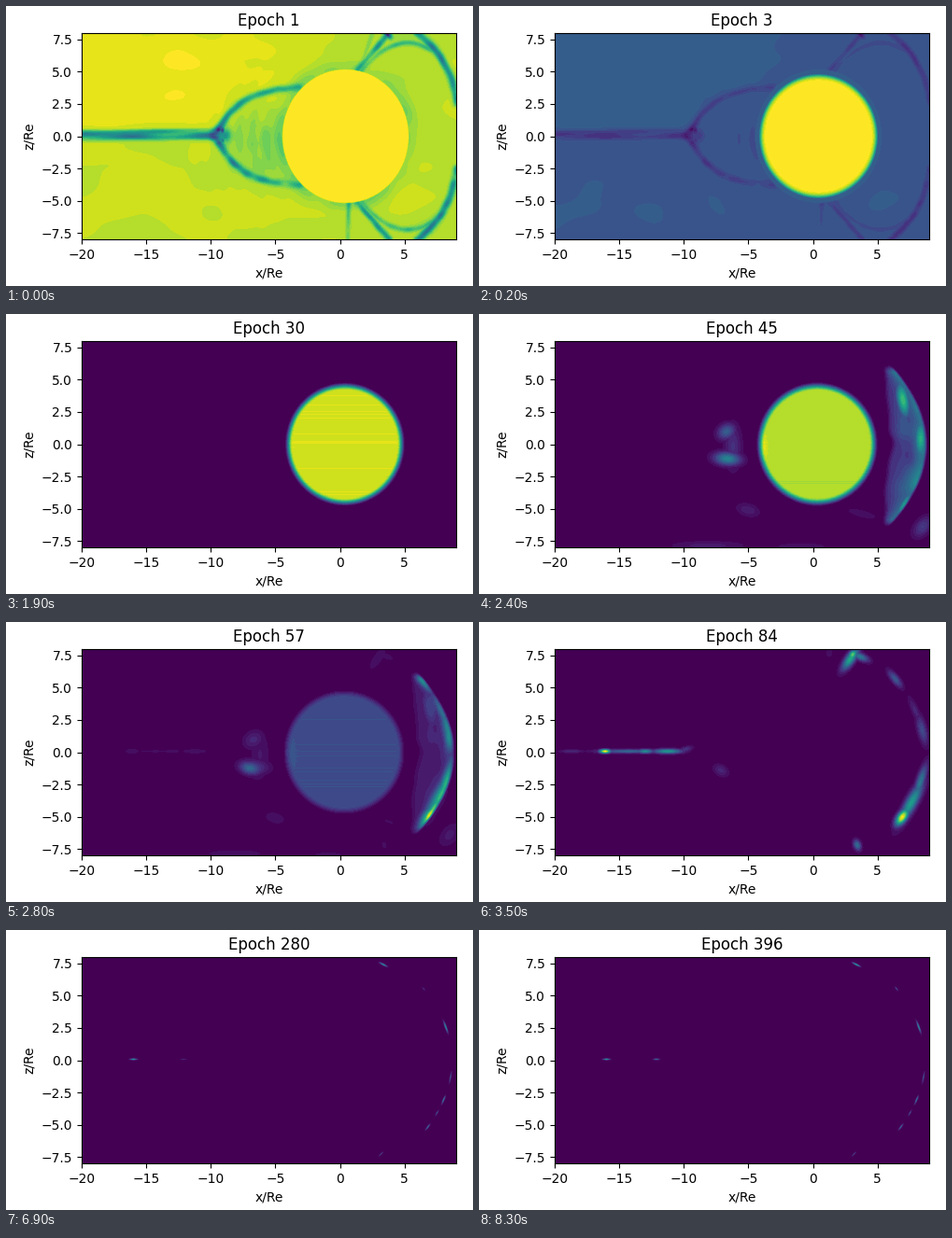
These frames come from a looping animation (500 px wide and 300 px high, 8400 ms). A matplotlib script:

```python
import numpy as np
import matplotlib.pyplot as plt
from matplotlib.animation import FuncAnimation

# Plot area in stage pixels (y runs downwards)
LEFT, TOP, W, H = 81, 29, 401, 221
MID = 139.5
FRAMES, STEP = 84, 100
LEVELS = 28
EPS = 0.01

X, Y = np.meshgrid(LEFT + 0.5 + np.arange(W), TOP + 0.5 + np.arange(H))
rng = np.random.default_rng(7)


def noise(sx, sy):
    """Smooth random field with feature sizes sx, sy in pixels."""
    def weights(n, s):
        knots = np.arange(-s, n + 2 * s, s)
        m = np.exp(-((np.arange(n)[:, None] - knots) / (0.75 * s)) ** 2)
        return m / m.sum(1, keepdims=True)
    wx, wy = weights(W, sx), weights(H, sy)
    return 1.6 * wy @ rng.normal(size=(wy.shape[1], wx.shape[1])) @ wx.T


def sigmoid(v):
    return 1 / (1 + np.exp(-v))


def smooth(v):
    v = np.clip(v, 0, 1)
    return v * v * (3 - 2 * v)


def top(*fields):
    return np.max(fields, axis=0)


def spot(x, y, deg, a, b, amp):
    c, s = np.cos(np.radians(deg)), np.sin(np.radians(deg))
    u = (X - x) * c + (Y - y) * s
    v = (Y - y) * c - (X - x) * s
    return amp * np.exp(-(u / a) ** 2 - (v / b) ** 2)


def arc_spot(y, a, b, amp):
    """Spot lying along the dayside arc."""
    d = (y - 140) / 85
    slope = np.degrees(np.arctan2(85, -74 * d))
    return spot(477.5 - 37 * d * d, y, slope, a, b, amp)


def tail_spot(x, a, b, amp):
    return spot(x, 138.5, 0, a, b, amp)


def stroke(xs, ys, width, amp):
    out = np.zeros_like(X)
    for x, y, a in zip(xs, ys, np.broadcast_to(amp, len(xs))):
        np.maximum(out, a * np.exp(-((X - x) ** 2 + (Y - y) ** 2) / width ** 2), out)
    return out


def mirrored(xs, rise, width, amp):
    """The same line above and below the midplane."""
    return np.maximum(stroke(xs, MID - rise, width, amp),
                      stroke(xs, MID + rise, width, amp))


def radius(cx, rx, ry):
    return np.hypot((X - cx) / rx, (Y - MID) / ry)


def disk(cx, rx, ry, soft):
    return smooth((1 - radius(cx, rx, ry)) * rx / soft)


def field_lines():
    t = np.linspace(0, 1, 60)
    x = 228 + 86 * t
    lobe = mirrored(x, 8 + 46 * (1 - np.exp(-(x - 228) / 26)), 3.6, 0.4 - 0.2 * t)
    cusp = mirrored(376 + 34 * t, 71 + 39 * t, 3, 0.22 + 0.2 * t)
    x = 379 + 78 * t
    loop = mirrored(x, 100 - 30 * ((x - 430) / 50) ** 2, 2.8, 0.13 + 0.08 * t)
    rise = 35 + 76 * t
    bow = mirrored(484 - 42 * (rise / 110) ** 3, rise, 3.7, 0.36 + 0.1 * t)
    south = stroke(367 - t, 210 + 40 * t, 2.5, 0.16 - 0.08 * t)
    north = stroke(380 + 12 * t, 66 - 36 * t, 2.5, 0.12 - 0.06 * t)
    return top(lobe, cusp, loop, bow, south, north, spot(409, 31, 45, 5, 3, 0.75))


def magnetosphere():
    up = sigmoid((128 - Y) / 7)
    left = sigmoid((300 - X) / 32)
    v = 0.88 + left * (0.02 + 0.055 * up) + 0.012 * noise(34, 16)

    # closed lines behind the planet, and its halo
    ripple = np.cos(np.hypot(X - 350, Y - MID) / 2.3) + noise(9, 12)
    v -= spot(272, 140, 0, 40, 46, 1) * (0.085 + 0.02 * ripple)
    rho = radius(363.5, 67.5, 71.5)
    v -= 0.07 * np.exp(-((rho - 1) * 7) ** 2) * (1 + 0.3 * noise(14, 14))
    v += spot(430, 215, -20, 22, 14, 0.04)

    # tail current sheet
    mid = 138.5 + 1.2 * noise(40, 400)
    sheet = np.exp(-((Y - mid) / 6) ** 4) * sigmoid((232 - X) / 4)
    v -= sheet * (0.33 + 0.09 * noise(28, 3))
    v -= top(tail_spot(210, 24, 4, 0.12), tail_spot(236, 5, 9, 0.2),
             spot(232, 133, 90, 3.5, 2.2, 0.5), spot(232, 144, 60, 3, 2.2, 0.35),
             spot(225, 134, -35, 10, 4, 0.33), spot(225, 143, 35, 10, 4, 0.33))

    v -= field_lines() * (1 + 0.22 * noise(7, 7))
    face = smooth((1 - rho) * 34 + 0.5)
    return np.clip(v * (1 - face) + face, 0.02, 0.999)


def striped(amount):
    rows = rng.normal(size=(H, 1)) * (rng.random((H, 1)) < 0.6)
    return amount * np.clip(rows, -2, 1.4)


def crescent():
    d = (Y - 140) / 85
    outer = 481 - 38 * d * d
    inner = 430 + 7 * np.exp(-4 * d * d) + 1.5 * noise(400, 12)
    u = np.clip((X - inner) / np.maximum(outer - inner, 1), 0, 1)
    edge = smooth((outer - X) / 5) * smooth((X - inner) / 8)
    ends = smooth((88 - abs(Y - 141.5)) / 10)
    body = (0.1 + 0.38 * u ** 1.3) * (1 + 0.14 * noise(10, 14))
    glow = top(spot(454, 92, 80, 20, 7, 0.68), spot(473, 134, 90, 22, 7, 0.62),
               spot(456, 206, 118, 18, 6, 0.62))
    return np.maximum(body, glow) * edge * ends


def half_trained():
    face = disk(362, 66, 67.5, 10)
    face = face * (0.87 + striped(0.009) + spot(303, 143, 90, 16, 5, 0.1))
    return top(face, crescent(),
               spot(265, 126, -30, 10, 8, 0.3), spot(266, 155, 5, 14, 7, 0.45),
               spot(272, 142, 90, 24, 9, 0.15), spot(288, 210, 15, 13, 7, 0.1),
               spot(245, 248, 0, 40, 5, 0.09), spot(345, 249, 0, 30, 4, 0.07),
               spot(475, 228, -50, 13, 8, 0.18), spot(410, 214, 15, 20, 5, 0.06))


def arcs():
    day = top(arc_spot(209, 10, 5, 0.97), arc_spot(194, 24, 6, 0.55),
              arc_spot(172, 20, 4.5, 0.4), arc_spot(116, 16, 5, 0.23),
              arc_spot(95, 16, 4, 0.12), arc_spot(61, 11, 4, 0.28))
    tail = top(tail_spot(135, 6, 2.2, 0.98), tail_spot(160, 32, 2.2, 0.33),
               tail_spot(178, 9, 2.4, 0.48), tail_spot(202, 15, 2.6, 0.53),
               tail_spot(99, 13, 2, 0.13), spot(221, 136.5, -15, 8, 3, 0.16))
    poles = top(spot(398, 39, -55, 14, 5, 0.6), spot(400, 35, -50, 6, 4, 0.74),
                spot(408, 37, 25, 10, 4, 0.4), spot(405, 239, 70, 6, 4, 0.36),
                spot(375, 33, 0, 4, 5, 0.07), spot(259, 159, 30, 9, 6, 0.12))
    return top(day, tail, poles)


def slivers():
    return top(arc_spot(182, 13, 2.3, 0.36), arc_spot(203, 14, 2.2, 0.3),
               arc_spot(62, 4, 1.6, 0.2), arc_spot(107, 10, 2, 0.26),
               arc_spot(159, 7, 1.6, 0.22),
               tail_spot(135, 5, 1.3, 0.66), tail_spot(164, 6, 1.1, 0.36),
               tail_spot(190, 5, 1, 0.12),
               spot(402, 35, 48, 6, 2.6, 0.98), spot(406, 39, 20, 4, 2, 0.4),
               spot(403, 239, -35, 5, 2, 0.2), spot(400, 244, 95, 4, 1.6, 0.15))


def needles(pole, tail, small):
    return top(arc_spot(63, 2.4, 0.9, small), arc_spot(104, 6, 1, 0.44),
               arc_spot(158, 5.5, 0.8, 0.26), arc_spot(182, 4.5, 0.9, 0.36),
               arc_spot(196, 3.2, 0.8, 0.24), arc_spot(211, 3.6, 0.9, 0.32),
               tail_spot(136.5, 3.4, 0.9, 0.5), tail_spot(190, 3.4, 0.9, tail),
               spot(404, 37, 27, 4.2, 1, pole), spot(401.5, 240, 135, 2.8, 0.8, 0.2))


KEYS = [0, 8, 18, 24, 35, 50, 69, 83]
layers = [
    magnetosphere(),
    disk(363.5, 64, 67, 8) * (0.945 + striped(0.016)),
    disk(363, 65, 67, 9) * (0.92 + striped(0.013)),
    half_trained(),
    arcs(),
    slivers(),
    needles(0.45, 0.12, 0.12),
    needles(0.5, 0.3, 0.22),
]
peaks = [v.max() for v in layers]
logs = [np.log(np.maximum(v, 0) + EPS) for v in layers]


def field(i):
    """Blend neighbouring states geometrically, so that peaks sharpen."""
    k = min(np.searchsorted(KEYS, i, side="right") - 1, len(KEYS) - 2)
    u = (i - KEYS[k]) / (KEYS[k + 1] - KEYS[k])
    v = np.exp((1 - u) * logs[k] + u * logs[k + 1]) - EPS
    v *= np.interp(i, KEYS, peaks) / v.max()
    return np.clip(np.floor(v * LEVELS), 0, LEVELS - 1)


def epoch(i):
    return 1 + sum(1 + (k + 1) // 10 for k in range(i))


fig = plt.figure(figsize=(5, 3), dpi=100)
ax = fig.add_axes([LEFT / 500, 1 - (TOP + H) / 300, W / 500, H / 300])
image = ax.imshow(field(0), extent=[-20, 9, -8, 8], aspect="auto", cmap="viridis",
                  vmin=0, vmax=LEVELS - 1, interpolation="nearest")
ax.set_xticks(range(-20, 6, 5))
ax.set_yticks(np.arange(-7.5, 8, 2.5))
ax.set_xlabel("x/Re")
ax.set_ylabel("z/Re")
title = ax.set_title("Epoch 1")


def draw(i):
    image.set_data(field(i))
    title.set_text(f"Epoch {epoch(i)}")
    return image, title


anim = FuncAnimation(fig, draw, frames=FRAMES, interval=STEP, repeat=True)
plt.show()
```
